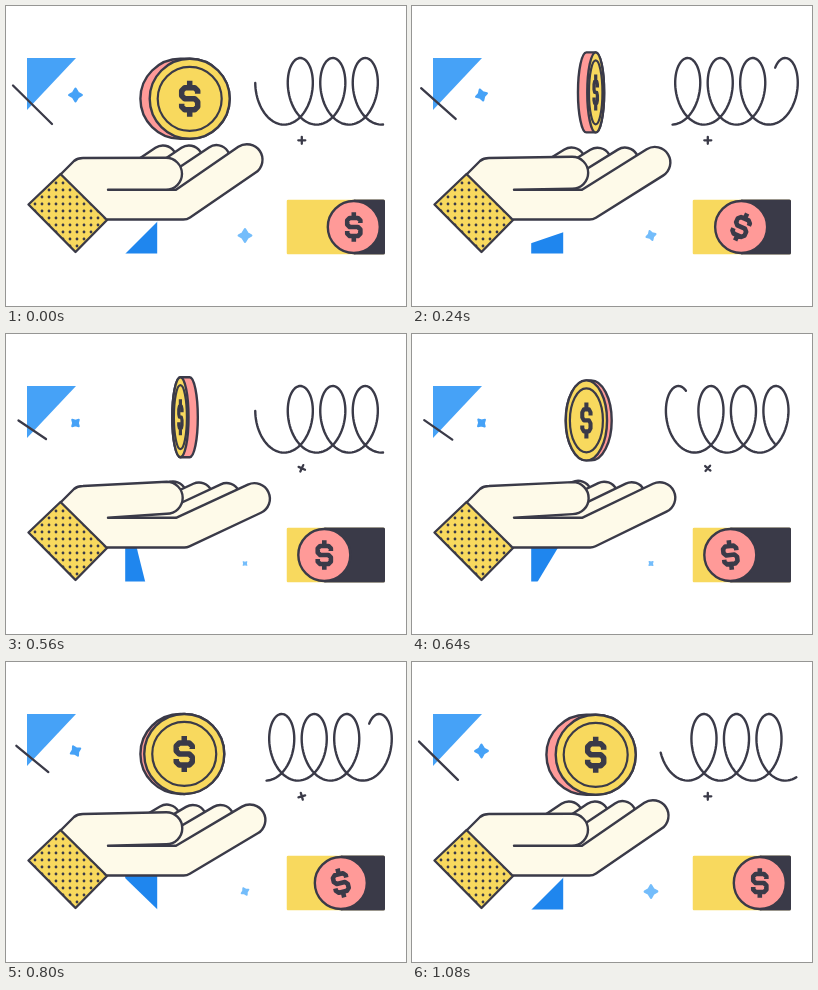
An HTML page with a canvas that plays this animation: 400x300 px, repeating every 1120 ms.

```html
<!DOCTYPE html>
<html lang="en">
<head>
<meta charset="utf-8">
<title>Coin in hand</title>
<style>
html, body { margin: 0; height: 100%; overflow: hidden; background: #fff; }
canvas { display: block; }
</style>
</head>
<body>
<canvas id="stage" width="400" height="300"></canvas>
<script>
const ctx = document.getElementById('stage').getContext('2d');
const LOOP = 1120, STEP = 40, { PI, sin, cos, pow, min, max } = Math, TAU = 2 * PI;
const INK = '#3a3a48', YELLOW = '#f8d95e', PINK = '#ff9a98', SKIN = '#fefae9',
      SKY = '#46a2f7', BLUE = '#1f86ee', PALE = '#74bdfb';
const LINE = 2.4;
const DOLLAR = new Path2D('M8-5V-8L5-11H-5L-8-8V-3L-5 0H5L8 3V8L5 11H-5L-8 8V5M0-18V-11M0 11V18');

const mix = (a, b, k) => a + (b - a) * k;
const clamp = x => max(0, min(1, x));
const ramp = (t, a, b) => clamp((t - a) / (b - a));
const ease = x => (1 - cos(PI * x)) / 2;

// Piecewise linear value through [time, value] pairs
function track(t, keys) {
  let i = 1;
  while (i < keys.length - 1 && t > keys[i][0]) i++;
  const [t0, a] = keys[i - 1], [t1, b] = keys[i];
  return mix(a, b, ramp(t, t0, t1));
}

function fill(color, path) {
  ctx.fillStyle = color;
  path ? ctx.fill(path) : ctx.fill();
}
function stroke(color, width, path) {
  ctx.strokeStyle = color;
  ctx.lineWidth = width;
  path ? ctx.stroke(path) : ctx.stroke();
}
function poly(points) {
  ctx.beginPath();
  points.forEach(p => ctx.lineTo(...p));
  ctx.closePath();
}
function placed(x, y, angle, draw) {
  ctx.save();
  ctx.translate(x, y);
  ctx.rotate(angle);
  draw();
  ctx.restore();
}

function dollar(x, y, angle, sx, sy, width) {
  const sign = new Path2D();
  sign.addPath(DOLLAR, new DOMMatrix([sx, 0, 0, sy, 0, 0]));
  placed(x, y, angle, () => {
    ctx.lineCap = 'butt';
    stroke(INK, width, sign);
  });
}

function star(x, y, angle, size, color) {
  placed(x, y, angle, () => {
    const points = [];
    for (let i = 0; i < 8; i++) {
      const r = i % 2 ? size * .52 : size;
      points.push([r * cos(i * PI / 4), r * sin(i * PI / 4)]);
    }
    poly(points);
    fill(color);
    stroke(color, size * .4);
  });
}

function coil(t) {
  const p = t % 560 / 560;
  const from = track(p, [[0, 1.32], [.286, -2.4], [.4286, -3.1], [.643, -3.26], [.714, -3.98], [.929, -4.55], [1, -4.96]]);
  const to = track(p, [[0, 22.05], [.286, 20.42], [.4286, 19.63], [.643, 17.76], [.714, 17.28], [.929, 16.16], [1, 15.77]]);
  ctx.beginPath();
  for (let i = 0; i <= 240; i++) {
    const a = mix(from, to, i / 240);
    ctx.lineTo(261.8 + 32.5 * (p + a / TAU) - 20 * sin(a), 85.3 - 33.3 * cos(a));
  }
  stroke(INK, LINE);
}

// Half-plane turning inside a square window
function wedge(t) {
  const turn = track(t, [[0, 0], [240, 26], [400, 67], [560, 121], [720, 211], [920, 356], [1000, 360], [LOOP, 360]]);
  ctx.save();
  ctx.beginPath();
  ctx.rect(119.2, 213, 32, 34.5);
  ctx.clip();
  placed(135.2, 231.7, (turn - 45) * PI / 180, () => {
    ctx.fillStyle = BLUE;
    ctx.fillRect(-60, 0, 120, 60);
  });
  ctx.restore();
}

function note(t) {
  const x = 347.8 - 29.5 * (ease(ramp(t, 0, 410)) - ease(ramp(t, 660, 920)));
  const tilt = track(t, [[0, 0], [240, 24], [400, 0], [560, 0], [720, -12], [920, -15], [1040, 0], [LOOP, 0]]);
  ctx.save();
  ctx.beginPath();
  ctx.roundRect(280.5, 193.5, 98.5, 55, 1.5);
  ctx.clip();
  fill(YELLOW);
  ctx.fillStyle = INK;
  ctx.fillRect(x, 193, 100, 56);
  ctx.restore();
  ctx.beginPath();
  ctx.arc(x, 221, 26, 0, TAU);
  fill(PINK);
  stroke(INK, LINE);
  dollar(x, 221, tilt * PI / 180, .82, .82, 4.6);
}

function coin(t) {
  const y = 92.8 - 12.8 * (t < 400 ? ease(ramp(t, 80, 400)) : 1 - ease(ramp(t, 400, 880)));
  const s = t < 400 ? pow(1 - t / 400, 1.7) : pow(ramp(t, 400, 720), 2.3);
  const near = 174.4, far = 183.7, r = 40;
  const front = t < 400 ? far : mix(near, far, ease(ramp(t, 720, 900)));
  const back = t < 400 ? near : mix(far, near, ramp(t, 560, 720));
  const left = min(front, back), right = max(front, back);
  ctx.beginPath();
  ctx.ellipse(left, y, r * s, r, 0, PI / 2, PI * 1.5);
  ctx.ellipse(right, y, r * s, r, 0, -PI / 2, PI / 2);
  ctx.closePath();
  fill(PINK);
  stroke(INK, LINE);
  if (s < .01) return;
  ctx.beginPath();
  ctx.ellipse(front, y, r * s, r, 0, 0, TAU);
  fill(YELLOW);
  stroke(INK, LINE);
  ctx.beginPath();
  ctx.ellipse(front, y, 32 * s, 32, 0, 0, TAU);
  stroke(INK, 2.2);
  dollar(front, y, 0, s, 1, mix(2.6, 5.5, s));
}

function finger(x, y, angle, length) {
  ctx.beginPath();
  ctx.moveTo(x, y);
  ctx.lineTo(x - length * cos(angle), y + length * sin(angle));
  stroke(INK, 29.4);
  stroke(SKIN, 24.6);
}

function hand(t) {
  const h = t < 560 ? ease(ramp(t, 80, 560)) : 1 - ease(ramp(t, 560, 980));
  const a = mix(34, 25, h) * PI / 180;
  finger(157 + 10 * h, 153 + 8 * h, a, 30);
  finger(183 + 10 * h, 153 + 9 * h, a, 40);
  finger(210.5 + 10 * h, 152.6 + 10 * h, a, 50);

  // Index finger and palm
  const x = 241 + 7.4 * h, y = 153.7 + 11 * h, r = 15.5;
  const palm = new Path2D();
  palm.moveTo(101, 213.5);
  palm.arcTo(181, 213.5, x + r * sin(a), y + r * cos(a), 12);
  palm.arc(x, y, r, PI / 2 - a, -PI / 2 - a, true);
  palm.lineTo(170, 183.8);
  palm.lineTo(102, 183.8);
  const palmFill = new Path2D(palm);
  palmFill.lineTo(102, 176);
  palmFill.lineTo(165, 176);
  palmFill.lineTo(170, 184);
  palmFill.lineTo(101, 184);
  fill(SKIN, palmFill);
  stroke(INK, LINE, palm);

  // Thumb and wrist
  const tx = 160 + .7 * h, ty = 167.8 - 4 * h;
  const thumb = new Path2D();
  thumb.moveTo(55, 168);
  thumb.lineTo(68, 155);
  thumb.quadraticCurveTo(71.5, 152, 77, 152);
  thumb.lineTo(tx, ty - 16);
  thumb.arc(tx, ty, 16, -PI / 2, PI / 2);
  thumb.lineTo(102, 183.8);
  const wrist = new Path2D(thumb);
  wrist.lineTo(101, 213.5);
  fill(SKIN, wrist);
  stroke(INK, LINE, thumb);

  // Dotted cuff
  const cuff = [[22.5, 198.5], [54.5, 168], [101, 214], [69.5, 246]];
  poly(cuff);
  fill(YELLOW);
  ctx.save();
  ctx.clip();
  for (let i = 0; i < 11; i++)
    for (let j = 0; j < 11; j++) {
      ctx.beginPath();
      ctx.arc(29 + i * 7, 177 + j * 7, 1.4, 0, TAU);
      fill(INK);
    }
  ctx.restore();
  poly(cuff);
  stroke(INK, LINE);
}

function draw(t) {
  const e = ease(t / 560);
  ctx.fillStyle = '#fff';
  ctx.fillRect(0, 0, 400, 300);
  ctx.lineCap = ctx.lineJoin = 'round';

  poly([[21, 52], [70, 52], [21, 104]]);
  fill(SKY);
  ctx.beginPath();
  ctx.moveTo(mix(7, 12.5, e), mix(79.5, 86.5, e));
  ctx.lineTo(mix(46, 40, e), mix(118, 105, e));
  stroke(INK, 2.3);

  star(69.5, 89, -e * PI / 4, mix(6.2, 4.7, e), SKY);
  star(239, 229.5, -e * PI / 4, mix(6.2, 2.6, e), PALE);
  placed(295.8, 134.3, ramp(t, 440, 880) * PI / 2, () =>
    stroke(INK, 2.3, new Path2D('M-3.5 0H3.5M0-3.5V3.5')));

  coil(t);
  wedge(t);
  note(t);
  hand(t);
  coin(t);
}

const start = performance.now();
function tick() {
  const t = (performance.now() - start) % LOOP;
  draw(Math.floor(t / STEP) * STEP);
  requestAnimationFrame(tick);
}
tick();
</script>
</body>
</html>
```
